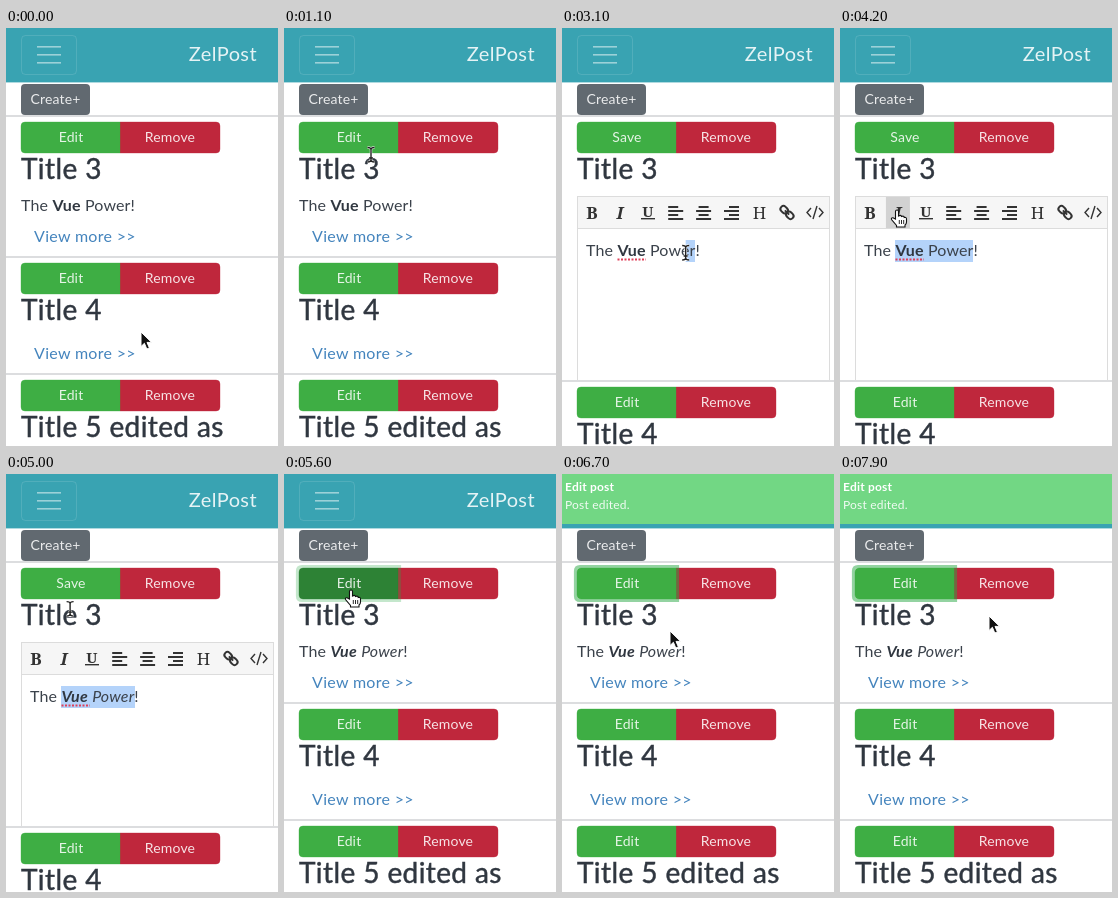
Recreate the animation shown at these times as an HTML page. Size 272 by 418 pixels, loop 8000 ms.

```html
<!DOCTYPE html>
<html lang="en">
<head>
<meta charset="utf-8">
<style>
html, body { margin: 0; width: 100%; height: 100%; overflow: hidden; background: #fff; }
svg { display: block; }
text { font: 16px Lato, sans-serif; letter-spacing: .15px; fill: #3b424b; }
.title { font-size: 28px; letter-spacing: .4px; fill: #303740; stroke: #303740; stroke-width: .45; }
.btn { font-size: 14px; fill: #fff; fill-opacity: .87; text-anchor: middle; }
.link { fill: #4484bd; letter-spacing: .3px; }
.note { font-size: 12px; letter-spacing: .2px; fill: #fff; }
.tool { font: bold 17px "Noto Serif", serif; text-anchor: middle; letter-spacing: 0; fill: #333; }
.b { font-weight: bold; fill: #303740; }
.note.b { fill: #fff; }
.italic .i { font-style: italic; }
.line { fill: none; stroke: #333; stroke-width: 2; }
</style>
</head>
<body>
<svg id="stage" width="272" height="418" viewBox="0 0 272 418"></svg>
<script>
const LOOP = 8000;
const GREEN = [62, 174, 68], DARK = [45, 130, 53];
const stage = document.getElementById('stage');

const rect = (x, y, w, h, fill, more = '') =>
  `<rect x="${x}" y="${y}" width="${w}" height="${h}" fill="${fill}" ${more}/>`;
const text = (x, y, s, cls = '', more = '') =>
  `<text x="${x}" y="${y}" class="${cls}" ${more}>${s}</text>`;
const path = (d, more = 'class="line"') => `<path d="${d}" ${more}/>`;
const rule = y => rect(0, y, 272, 2, '#dcdddf');

// A faint outline softens the button edges.
const soft = color => `fill="${color}" stroke="${color}" stroke-opacity=".35"`;
const leftButton = (y, id = '') =>
  path(`M114 ${y}v31H19q-4 0-4-4v-23q0-4 4-4z`, `${soft(`rgb(${GREEN})`)} ${id}`);
const removeButton = y =>
  path(`M114 ${y}h96q4 0 4 4v23q0 4-4 4h-96z`, soft('#bf273c')) + text(164, y + 20, 'Remove', 'btn');
const post = (y, title) => rule(y - 7) + removeButton(y) + leftButton(y) +
  text(65, y + 20, 'Edit', 'btn') + text(15, y + 56.5, title, 'title');
const body = (x, y) => text(x, y,
  'The <tspan class="b i">Vue</tspan> <tspan class="i">Power</tspan>!', 'body');
const more = y => text(28, y, 'View more &gt;&gt;', 'link');

// Toolbar cells are evenly spaced.
const cell = i => 30 + 27.9 * i;
const align = (i, offset) => [0, 4, 8, 12].map((dy, k) => {
  const w = k % 2 ? 15 : 10;
  return rect(cell(i) - 7.5 + (15 - w) * offset, 178 + dy, w, 2, '#333');
}).join('');
const toolbar =
  text(cell(0), 191, 'B', 'tool') +
  text(cell(1), 191, 'I', 'tool', 'style="font-style:italic"') +
  text(cell(2), 189, 'U', 'tool', 'style="font-size:15px"') + rect(79, 190, 14, 1.4, '#333') +
  align(3, 0) + align(4, .5) + align(5, 1) +
  text(cell(6), 191, 'H', 'tool', 'style="font-weight:500"') +
  `<g transform="translate(225 184.5) rotate(45)" class="line">
    <rect x="-8" y="-3" width="8" height="6" rx="3"/><rect x="0" y="-3" width="8" height="6" rx="3"/>
    <path d="M-3 0h6"/></g>` +
  path('M249 180l-4 4.5 4 4.5M257 180l4 4.5-4 4.5M255 178l-4 13', 'class="line" style="stroke-width:1.4"');

const arrow = path('M0 0V14.5L3.4 11.3 5.8 17 8.4 15.9 6 10.4H10.6Z',
  'fill="#111" stroke="#fff" stroke-width="1"');
const ibeam = ['stroke="#fff" stroke-width="2.4"', 'stroke="#222" stroke-width="1.4"'].map(s =>
  path('M-3.5-7.5Q0-7.5 0-5.5Q0-7.5 3.5-7.5M0-6V6M-3.5 7Q0 7 0 5Q0 7 3.5 7M-2 3H2',
    `fill="none" ${s}`)).join('');
const hand = path('M-1.5 9V1.5Q-1.5 0 0 0T1.5 1.5V6Q4 4.5 4.5 6.5Q7 5.5 7.2 7.5Q9.5 7 9.5 9V12' +
  'Q9.5 14 8 15V17H-.5V15.5L-5.5 9.5Q-6 7.5-4 7.7Z', 'fill="#fff" stroke="#111" stroke-width="1.1"') +
  path('M2.3 10v4M4.5 10v4M6.7 10v4', 'stroke="#111" stroke-width=".9"');

stage.innerHTML =
  rect(0, 0, 272, 54.4, '#39a3b2') +
  rect(15.5, 7.5, 55, 39, 'none', 'rx="4" stroke="#fff" stroke-opacity=".12"') +
  [19, 27, 35].map(y => rect(31, y - 1, 24, 1.6, '#fff', 'opacity=".5"')).join('') +
  text(251, 33, 'ZelPost', '',
    'text-anchor="end" style="font-size:20px;fill:#fff;fill-opacity:.87;letter-spacing:.4px"') +
  rect(15, 56, 69, 31, '#616970', 'rx="4"') + text(49.5, 76, 'Create+', 'btn') +
  rule(87) + removeButton(94) +
  path('M115.5 92.5v34H18q-4.5 0-4.5-4.5v-25q0-4.5 4.5-4.5z',
    'id="ring" fill="none" stroke="#28a745" stroke-opacity=".5" stroke-width="3.2"') +
  leftButton(94, 'id="main"') + text(65, 114, '', 'btn', 'id="label"') +
  text(15, 150.5, 'Title 3', 'title') +
  `<g id="view">${body(15, 183)}${more(214)}${post(235, 'Title 4')}${more(331)}
    ${post(352, 'Title 5 edited as')}</g>` +
  `<g id="edit">${rect(15.5, 168.5, 252, 184, '#fff', 'stroke="#dcdcdc"')}
    ${rect(16, 169, 251, 31, '#f6f6f6')}${rect(16, 200, 251, 1, '#dcdcdc')}
    ${rect(0, 169, 24, 31, '#d2d2d2', 'id="hover"')}${toolbar}
    ${rect(55, 212, 0, 22, '#b4d3fa', 'id="selection"')}${body(24, 228)}
    ${path('M55.5 231.5H84', 'id="spell" stroke="#e0405a" stroke-width="2" stroke-dasharray="2 1.5"')}
    ${post(359, 'Title 4')}</g>` +
  `<g id="notice">${rect(0, 0, 272, 50, '#72d784')}${text(3, 17, 'Edit post', 'note b')}
    ${text(3, 35, 'Post edited.', 'note', 'opacity=".9"')}</g>` +
  `<g id="pointer"><g>${arrow}</g><g>${ibeam}</g><g>${hand}</g></g>`;

const el = {};
stage.querySelectorAll('[id]').forEach(n => el[n.id] = n);
const kinds = [...el.pointer.children];
const bodies = stage.querySelectorAll('.body');

// Pointer tip: time, x, y
const track = [
  [0, 135, 304], [150, 135, 304], [900, 98, 160], [1100, 87, 127], [1350, 68, 112], [1840, 68, 114],
  [2000, 79, 197], [2600, 133, 225], [2950, 133, 225], [3650, 55, 225], [3800, 55, 222],
  [4150, 57, 182], [4550, 57, 182], [5250, 67, 116], [5900, 67, 116], [6500, 108, 157],
  [7350, 108, 157], [7900, 149, 142], [LOOP, 149, 142]
];
const clamp = v => Math.max(0, Math.min(1, v));
const ramp = (t, start, length = 150) => clamp((t - start) / length);
const pulse = (t, from, to) => ramp(t, from) - ramp(t, to);
const show = (node, on) => node.style.display = on ? '' : 'none';

function pointerAt(t) {
  const i = track.findIndex(k => k[0] > t);
  const [t0, x0, y0] = track[i - 1], [t1, x1, y1] = track[i];
  const p = (t - t0) / (t1 - t0), e = p * p * (3 - 2 * p);
  return [x0 + (x1 - x0) * e, y0 + (y1 - y0) * e];
}

function pointerKind(x, y, editing) {
  if (y >= 94 && y < 126 && x < 214) return 2;
  if (y >= 126 && y < 152 && x < 94) return 1;
  if (editing) return y >= 168 && y < 200 ? 2 : y >= 200 ? 1 : 0;
  return y > 170 && y < 188 && x < 129 ? 1 : 0;
}

function draw(t) {
  const editing = t >= 1700 && t < 5530;
  const italic = t >= 4400;
  const [x, y] = pointerAt(t);
  const kind = pointerKind(x, y, editing);
  el.pointer.setAttribute('transform', `translate(${x} ${y})`);
  kinds.forEach((k, i) => show(k, i === kind));

  show(el.view, !editing);
  show(el.edit, editing);
  el.label.textContent = editing ? 'Save' : 'Edit';
  const dark = pulse(t, 1260, 1910) + pulse(t, 5180, 5960);
  const green = `rgb(${GREEN.map((c, i) => c + (DARK[i] - c) * dark)})`;
  el.main.setAttribute('fill', green);
  el.main.setAttribute('stroke', green);
  el.ring.style.opacity = pulse(t, 1650, 2940) + ramp(t, 5520);

  const tool = Math.round((x - 30) / 27.9);
  show(el.hover, editing && y >= 169 && y < 200);
  el.hover.setAttribute('x', cell(tool) - 12);
  const right = italic ? 129 : 133;
  const left = t < 3650 ? Math.max(55, Math.min(right, x)) : 55;
  el.selection.setAttribute('width', t < 2950 ? 0 : right - left);
  el.selection.setAttribute('x', left);
  show(el.spell, t >= 2950);
  bodies.forEach(b => b.classList.toggle('italic', italic));
  el.notice.style.opacity = ramp(t, 6000, 400);
}

function frame() {
  draw(performance.now() % LOOP);
  requestAnimationFrame(frame);
}
frame();
</script>
</body>
</html>
```
